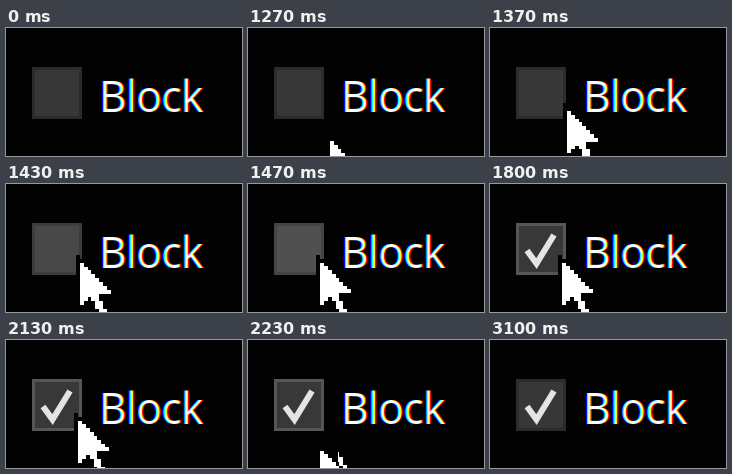
Animation of 236 by 128 pixels, one loop 3.97 s. Source, as an HTML page with a canvas:

```html
<!DOCTYPE html>
<html>
<head>
<meta charset="utf-8">
<style>
html, body { margin: 0; width: 100%; height: 100%; overflow: hidden; background: #020202; }
canvas { display: block; }
</style>
</head>
<body>
<canvas id="stage" width="236" height="128"></canvas>
<script>
const W = 236, H = 128, LOOP = 3970;
const CELL = 3.85;                  // size of one magnified screen pixel
const REST = { x: 68.35, y: 70.8 }; // pointer tip while clicking
const BLACK = '#020202';
const ctx = document.getElementById('stage').getContext('2d');

const progress = (n, from, to) => Math.min(1, Math.max(0, (n - from) / (to - from)));
const mix = (a, b, u) => a + (b - a) * u;
const gray = v => `rgb(${v}, ${v}, ${v})`;

function drawBox(fill, border) {
  ctx.fillStyle = gray(border);
  ctx.fillRect(26, 39, 50, 52);
  ctx.fillStyle = gray(fill);
  ctx.fillRect(29, 42, 44, 46);
}

function drawTick() {
  ctx.strokeStyle = gray(228);
  ctx.lineWidth = 6;
  ctx.stroke(new Path2D('M37 66.5 L46.5 79.5 L64 51'));
}

// Each colour channel is shifted by a third of a cell, as on an LCD
function drawLabel() {
  ctx.save();
  ctx.globalCompositeOperation = 'lighter';
  ctx.font = '43px "Open Sans", sans-serif';
  ctx.letterSpacing = '-0.8px';
  ['#00f', '#0f0', '#f00'].forEach((color, i) => {
    ctx.fillStyle = color;
    ctx.fillText('Block', 92.8 + (i - 1) * CELL / 3, 84);
  });
  ctx.restore();
}

// Arrow head as a growing triangle, then the left leg and the stepped tail
function drawPointer(x, y) {
  const run = (row, col, count, color) => {
    const left = Math.round(x + col * CELL);
    ctx.fillStyle = color;
    ctx.fillRect(left, Math.round(y + row * CELL), Math.round(x + (col + count) * CELL) - left, 4);
  };
  const spans = row => row < 10
    ? [[1, row - 1]]
    : [[1, 13 - row], [Math.floor(row / 2) - 1, 2]];
  for (const [extra, color] of [[1, BLACK], [0, '#fff']]) {
    for (let row = 0; row < 16; row++) {
      for (const [col, count] of spans(row)) {
        if (count + 2 * extra > 0) run(row, col - extra, count + 2 * extra, color);
      }
    }
  }
}

function draw(t) {
  const n = Math.floor((t + 4) * 0.03); // steps at 30 per second
  ctx.fillStyle = BLACK;
  ctx.fillRect(0, 0, W, H);

  const hover = progress(n, 41, 44);
  const active = t >= 1570 && t < 3100;
  if (active) drawBox(56, 86);
  else if (t < 1570) drawBox(mix(55, 80, hover), mix(43, 68, hover));
  else drawBox(55, 43);

  if (t >= 1800) drawTick();
  drawLabel();

  if (t < 1270 || t >= 3100) return;
  const enter = progress(n, 38, 44);
  const leave = progress(n, 63, 67);
  // The tail of the resting pointer stays behind after it has left
  if (leave === 1) {
    ctx.save();
    ctx.beginPath();
    ctx.rect(90, 112, 12, 16);
    ctx.clip();
    drawPointer(REST.x, REST.y);
    ctx.restore();
  }
  drawPointer(
    mix(78, REST.x, enter),
    REST.y + 34.5 * (1 - enter) ** 3 + 32 * leave ** 2
  );
}

const start = performance.now();
function frame() {
  draw((performance.now() - start) % LOOP);
  requestAnimationFrame(frame);
}
frame();
</script>
</body>
</html>
```
